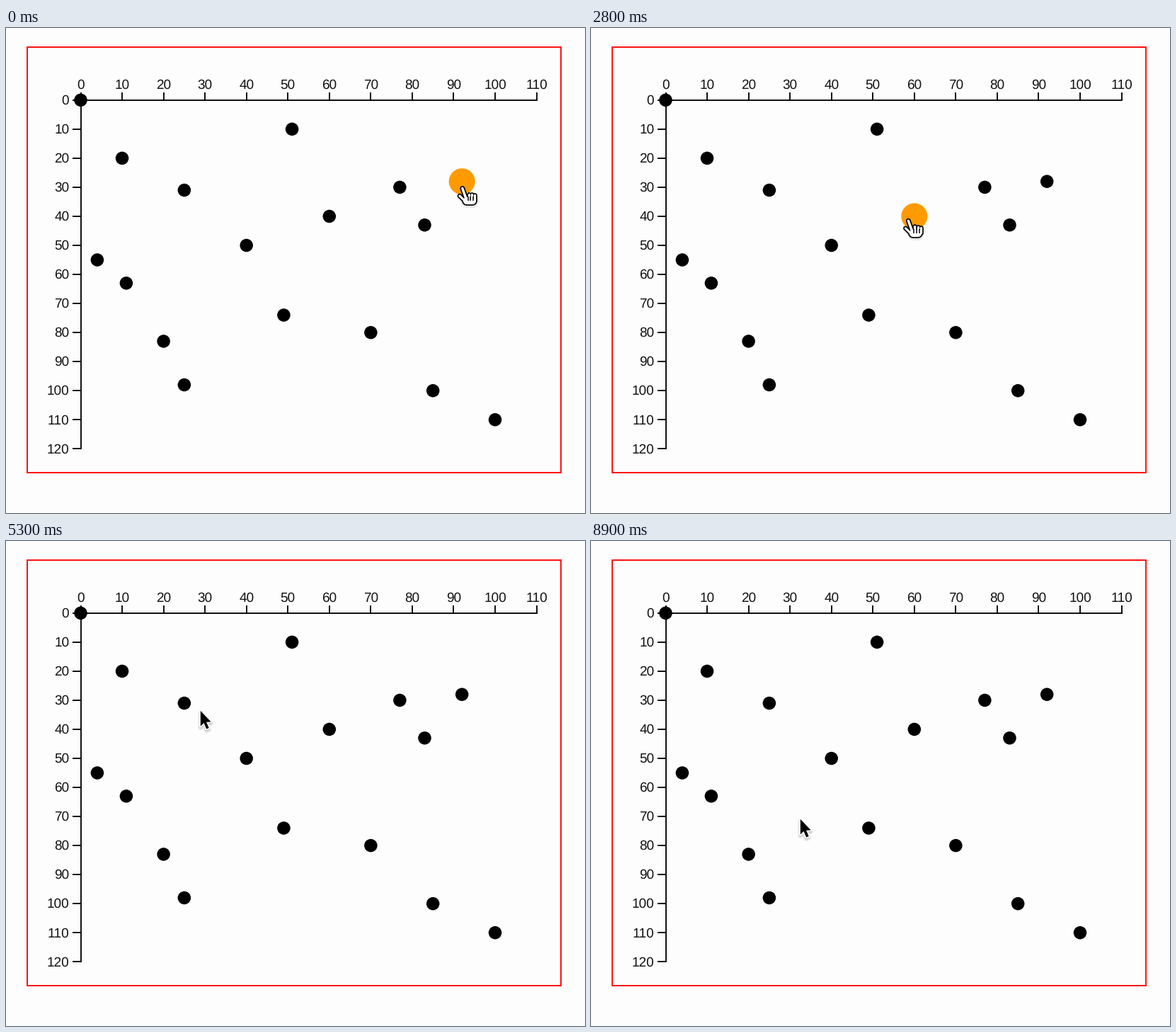
These frames come from a looping animation (818 px wide and 685 px high, 9 s). A matplotlib script:

```python
import matplotlib.pyplot as plt
import numpy as np
from matplotlib.animation import FuncAnimation
from matplotlib.patches import Circle, Polygon, Rectangle
from matplotlib.transforms import Affine2D

W, H, DPI = 818, 685, 64
PX = 72 / DPI  # one pixel in points
FRAMES, STEP = 90, 100
X0, Y0 = 105.5, 101.8
SX, SY = 5.855, 4.104
SCALE = 1.85
R, R_HOVER = 5 * SCALE, 10 * SCALE
INK, HOT = "black", "#ff9b00"

DATA = [(0, 0), (10, 20), (25, 31), (51, 10), (77, 30), (92, 28),
        (60, 40), (83, 43), (40, 50), (4, 55), (11, 63), (49, 74),
        (20, 83), (70, 80), (25, 98), (85, 100), (100, 110)]

# Pointer route: seconds, x, y
ROUTE = np.array([
    (0, 645, 224), (1.2, 591, 280), (1.9, 535, 283), (2.7, 457, 269),
    (3.8, 373, 305), (4.3, 340, 307), (5.3, 274, 238), (6.4, 252, 236),
    (7.5, 163, 363), (8.9, 295, 391)])

ARROW = [(0.8, 1.8), (0.8, 23.5), (5.5, 19), (9.2, 27.5), (12.7, 26),
         (9.1, 17.8), (15.6, 17.4)]

plt.rcParams.update({"font.family": "Liberation Sans",
                     "text.hinting": "none", "text.hinting_factor": 1})

fig = plt.figure(figsize=(W / DPI, H / DPI), dpi=DPI, facecolor="#fdfdfd")
ax = fig.add_axes([0, 0, 1, 1])
ax.set(xlim=(0, W), ylim=(H, 0))
ax.axis("off")


def at(x, y):
    return X0 + SX * x, Y0 + SY * y


def line(xs, ys, width=SCALE, color=INK, cap="butt", **kw):
    return ax.plot(xs, ys, color=color, lw=width * PX,
                   solid_capstyle=cap, **kw)[0]


def label(x, y, value, ha):
    ax.text(x, y + 6.6, str(value), fontsize=19.3 * PX, ha=ha,
            va="baseline", color="#111111")


def slopes(times, pts):
    """Harmonic mean of neighbouring speeds, zero where direction turns."""
    speed = np.diff(pts, axis=0) / np.diff(times)[:, None]
    a, b = speed[:-1], speed[1:]
    same = a * b > 0
    inner = np.where(same, 2 * a * b / np.where(same, a + b, 1), 0)
    return np.pad(inner, ((1, 1), (0, 0)))


def pointer_at(t):
    """Hermite curve through the route, without overshoot."""
    times, pts = ROUTE[:, 0], ROUTE[:, 1:]
    slope = slopes(times, pts)
    i = min(np.searchsorted(times, t, side="right") - 1, len(times) - 2)
    h = times[i + 1] - times[i]
    u = (t - times[i]) / h
    return ((1 + 2 * u) * (1 - u) ** 2 * pts[i]
            + u * (1 - u) ** 2 * h * slope[i]
            + u * u * (3 - 2 * u) * pts[i + 1]
            + u * u * (u - 1) * h * slope[i + 1])


def hover_track(tips):
    """Index of the hovered dot per step; an enlarged dot holds on longer."""
    track, held = [], None
    for tip in tips:
        dist = np.hypot(*(CENTERS - tip).T)
        if held is None or dist[held] > R_HOVER:
            near = int(dist.argmin())
            held = near if dist[near] <= R else None
        track.append(held)
    return track


# Frame and axes
ax.add_patch(Rectangle((30, 27), 754, 601, fill=False,
                       ec="#ff0000", lw=SCALE * PX))
line([X0, X0 + 110 * SX], [Y0, Y0], cap="projecting")
line([X0, X0], [Y0, Y0 + 120 * SY], cap="projecting")
for v in range(0, 121, 10):
    x, y = at(v, v)
    line([X0 - 6 * SCALE, X0], [y, y])
    label(X0 - 16.3, y - 0.5, v, "right")
    if v <= 110:
        line([x, x], [Y0 - 6 * SCALE, Y0])
        label(x, 79, v, "center")

CENTERS = np.array([at(*d) for d in DATA])
dots = [ax.add_patch(Circle(c, R, fc=INK, ec="none", zorder=3))
        for c in CENTERS]

# Both pointers share one movable transform
move = Affine2D()
place = move + ax.transData


def arrow_layer(face, edge, width, shift=0, alpha=None):
    pts = np.array(ARROW) + (0, shift)
    return ax.add_patch(Polygon(pts, fc=face, ec=edge, lw=width * PX,
                                alpha=alpha, joinstyle="round",
                                transform=place, zorder=5))


def hand_layer(color, grow, shift=0, alpha=None):
    """Finger, thumb, palm and knuckles as round strokes."""
    strokes = [((-0.2, 5), (2.4, 17), 5.2), ((-4.2, 4), (13, 21), 4.8),
               ((6, 13.5), (20, 20), 12)]
    strokes += [((x, x), (10.6 + 0.8 * i, 19), 5)
                for i, x in enumerate((8.8, 13, 17.2))]
    return [line(xs, np.array(ys) + shift, w + grow, color, "round",
                 alpha=alpha, transform=place, zorder=5)
            for xs, ys, w in strokes]


arrow = [arrow_layer(INK, INK, w, 2.2, 0.06) for w in (3, 5, 7)]
arrow += [arrow_layer(INK, "white", 3.4), arrow_layer(INK, "none", 0)]
hand = (hand_layer(INK, 3, 2, 0.08) + hand_layer(INK, 1.7)
        + hand_layer("white", -1.7))
hand += [line([x, x], [14.2, 20.4], 1.5, transform=place, zorder=6)
         for x in (7.6, 11.4, 15.2)]

tips = [pointer_at(k * STEP / 1000) for k in range(FRAMES)]
hovered = hover_track(tips)


def update(k):
    hot = hovered[k]
    for i, dot in enumerate(dots):
        dot.set_radius(R_HOVER if i == hot else R)
        dot.set_facecolor(HOT if i == hot else INK)
    move.clear().translate(*tips[k])
    for part in arrow:
        part.set_visible(hot is None)
    for part in hand:
        part.set_visible(hot is not None)
    return dots + arrow + hand


anim = FuncAnimation(fig, update, frames=FRAMES, interval=STEP,
                     repeat=True, repeat_delay=0, blit=False)
plt.show()
```
